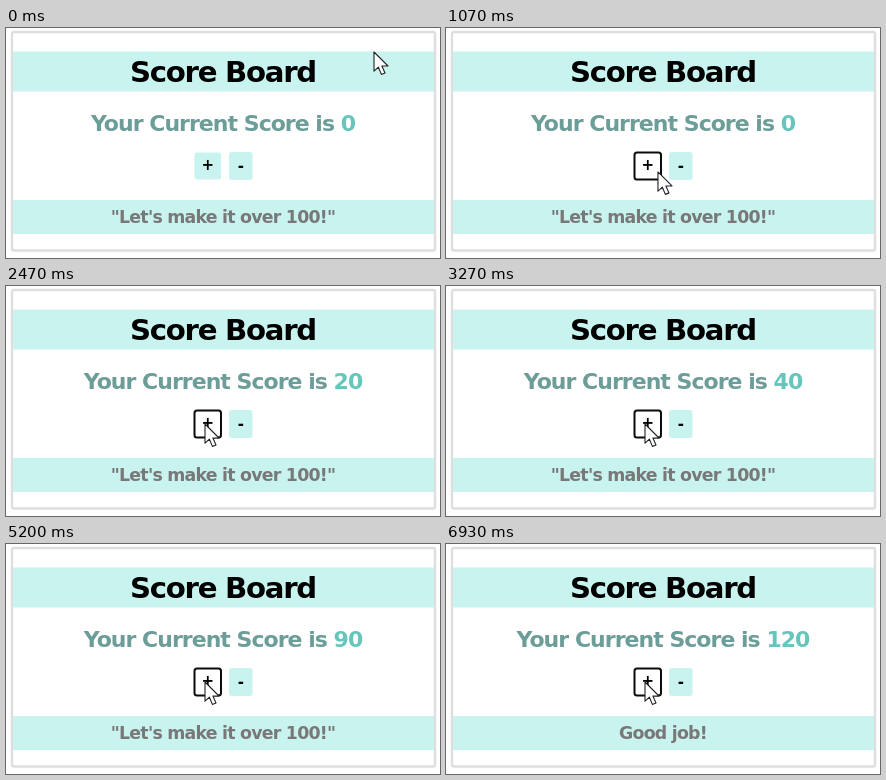
An HTML page that plays this animation: 434 px wide and 230 px high, repeating every 7.07 s.

```html
<!DOCTYPE html>
<html lang="en">
<head>
<meta charset="utf-8">
<title>Score Board</title>
<style>
  html, body { margin: 0; width: 100%; height: 100%; overflow: hidden; background: #fff; }
  svg { display: block; }
  text { font: bold 22px "DejaVu Sans", sans-serif; letter-spacing: -.044em; text-anchor: middle; }
  .band, .button { fill: #c8f3ee; }
  #title { font-size: 29.2px; }
  #score { fill: #6d9d99; }
  #count { fill: #66c6bb; }
  #note { font-size: 17.35px; fill: #787878; }
  .sign { font-size: 15px; letter-spacing: 0; }
  #plus.hover { fill: #fff; stroke: #080c0c; stroke-width: 2; }
  #plus.press { fill: #5fcabf; stroke: #080c0c; stroke-width: 2; }
</style>
</head>
<body>
<svg width="434" height="230" viewBox="0 0 434 230">
  <rect x="6" y="4" width="423" height="218.5" rx="2" fill="#fff" stroke="#dedede" stroke-width="2.4"/>
  <rect class="band" x="7" y="23.5" width="421" height="40"/>
  <text id="title" x="217" y="54">Score Board</text>
  <text id="score" x="217" y="103">Your Current Score is <tspan id="count">0</tspan></text>
  <rect id="plus" class="button" x="188.5" y="124.5" width="26.5" height="27" rx="2.5"/>
  <text class="sign" x="201.7" y="141.7">+</text>
  <rect class="button" x="223" y="124" width="23.5" height="28" rx="2.5"/>
  <text class="sign" x="234.9" y="142.5">-</text>
  <rect class="band" x="7" y="172" width="421" height="34"/>
  <text id="note" x="217" y="195"></text>
  <path id="cursor" d="M0 0V19.2L4.4 15.2 7.4 22.4 11 20.9 7.9 14H14Z" fill="#fff" stroke="#222" stroke-width="1.1" stroke-linejoin="round"/>
</svg>
<script>
const LOOP = 7070, HOLD = 150;
// Moments when each click is released and adds ten points
const clicks = [1870, 2330, 2770, 3140, 3870, 4070, 4270, 4670, 5070, 5530, 6130, 6730];
// Pointer path: time, x, y
const path = [[70, 368, 24], [400, 355, 32], [730, 310, 66], [1070, 212, 144], [1400, 199, 138]];
const $ = id => document.getElementById(id);

function pointerAt(t) {
  if (t <= path[0][0]) return path[0].slice(1);
  for (let i = 1; i < path.length; i++) {
    const [t0, x0, y0] = path[i - 1], [t1, x1, y1] = path[i];
    if (t < t1) {
      const k = (t - t0) / (t1 - t0);
      return [x0 + (x1 - x0) * k, y0 + (y1 - y0) * k];
    }
  }
  return path[path.length - 1].slice(1);
}

function draw(now) {
  const t = now % LOOP;
  const [x, y] = pointerAt(t);
  const score = 10 * clicks.filter(c => t >= c).length;
  const over = x > 188 && x < 215 && y > 124 && y < 152;
  const pressed = clicks.some(c => t >= c - HOLD && t < c);
  $("count").textContent = score;
  $("note").textContent = score > 100 ? "Good job!" : "\"Let's make it over 100!\"";
  $("plus").setAttribute("class", "button" + (pressed ? " press" : over ? " hover" : ""));
  $("cursor").setAttribute("transform", `translate(${x} ${y})`);
}

const start = performance.now();
function tick() {
  draw(performance.now() - start);
  requestAnimationFrame(tick);
}
tick();
</script>
</body>
</html>
```
